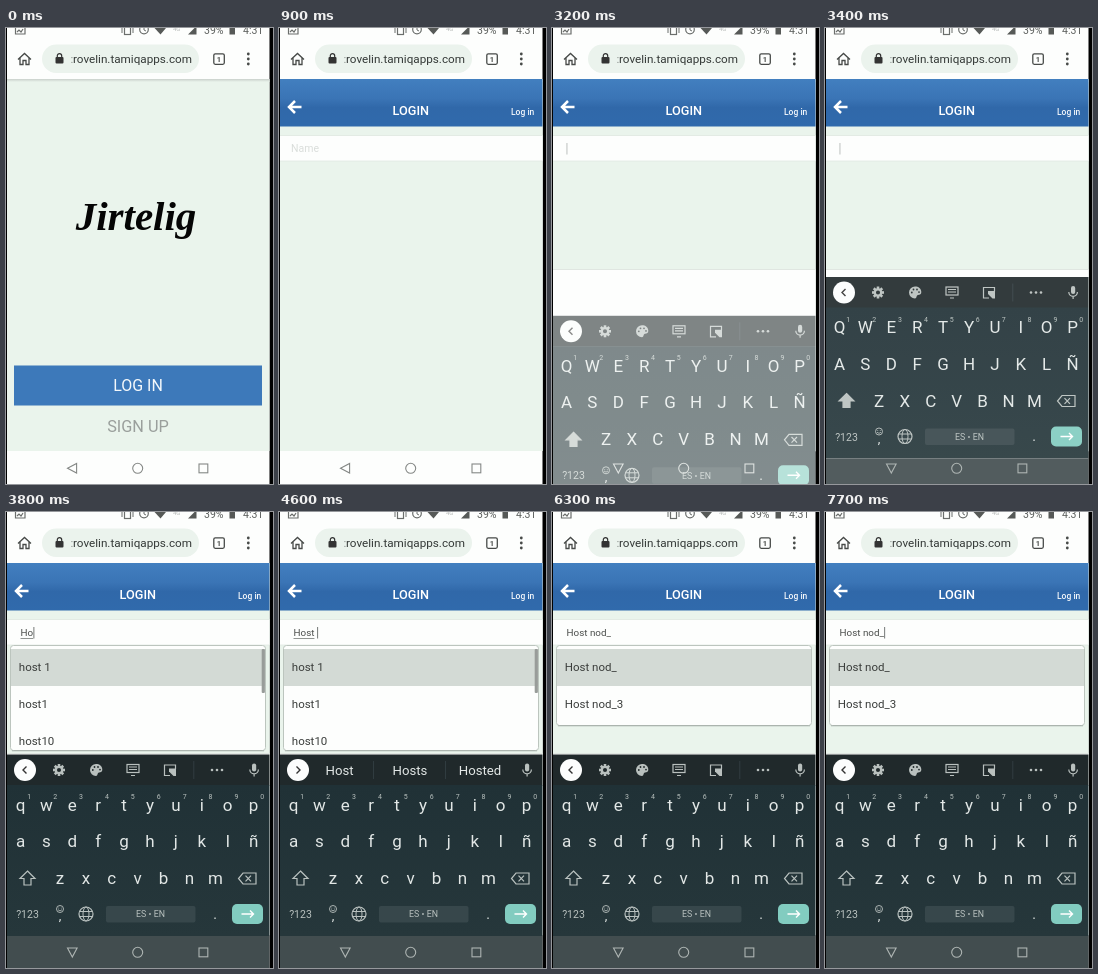
An HTML page for the animation above (8000 ms loop, 267 by 456 pixels).

```html
<!DOCTYPE html>
<html lang="en">
<head>
<meta charset="utf-8">
<title>Phone login</title>
<style>
html, body { margin: 0; width: 100%; height: 100%; overflow: hidden; background: #000; }
svg { display: block; width: 100vw; height: 100vh; font-family: Roboto, sans-serif; }
</style>
</head>
<body>
<svg id="stage" viewBox="0 0 267 456"></svg>
<script>
const LOOP = 8000, STEP = 100;
const stage = document.getElementById('stage');

function add(parent, tag, attrs = {}, text) {
  const el = document.createElementNS('http://www.w3.org/2000/svg', tag);
  for (const k in attrs) el.setAttribute(k, attrs[k]);
  if (text !== undefined) el.textContent = text;
  parent.appendChild(el);
  return el;
}
const group = (p, attrs) => add(p, 'g', attrs);
const rect = (p, x, y, width, height, fill, more) =>
  add(p, 'rect', { x, y, width, height, fill, ...more });
const circle = (p, cx, cy, r, fill, more) => add(p, 'circle', { cx, cy, r, fill, ...more });
const label = (p, x, y, size, fill, text, more) =>
  add(p, 'text', { x, y, 'font-size': size, fill, ...more }, text);
const line = (p, d, stroke, w = 1.2, more) =>
  add(p, 'path', { d, fill: 'none', stroke, 'stroke-width': w, ...more });
const shape = (p, d, fill) => add(p, 'path', { d, fill });
const MID = { 'text-anchor': 'middle' };
const ROUND = { 'stroke-linecap': 'round', 'stroke-linejoin': 'round' };
const show = (el, on) => el.setAttribute('display', on ? 'inline' : 'none');
const fade = (el, a) => el.setAttribute('opacity', a);
const clamp = v => Math.max(0, Math.min(1, v));

function gradient(defs, id, stops) {
  const g = add(defs, 'linearGradient', { id, x1: 0, y1: 0, x2: 0, y2: 1 });
  stops.forEach(([offset, color]) => add(g, 'stop', { offset, 'stop-color': color }));
}
const defs = add(stage, 'defs');
gradient(defs, 'bar', [[0, '#427fbf'], [0.42, '#3a74b5'], [0.6, '#3068a9'], [1, '#306aac']]);
gradient(defs, 'keys', [[0, '#203136'], [1, '#26373b']]);
gradient(defs, 'shade', [[0, '#c9d0cb'], [1, '#eaf4ec']]);
const clip = add(defs, 'clipPath', { id: 'screen' });
rect(clip, 1, 0, 262.5, 456, '#000');

rect(stage, 0, 0, 267, 456, '#000');
const screen = group(stage, { 'clip-path': 'url(#screen)' });
rect(screen, 0, 0, 264, 456, '#fdfefd');

// status bar
function drawStatus() {
  const g = group(screen), c = '#6b6e6c';
  line(g, 'M9.500 0V6H19V0M11 4L13 2L15 4L17 1', c, 1.2);
  rect(g, 118.5, -4, 6, 10.5, 'none', { stroke: c, 'stroke-width': 1.2 });
  line(g, 'M116 0V5M127 0V5', c, 1);
  circle(g, 138, 1.5, 4.3, 'none', { stroke: c, 'stroke-width': 1.2 });
  line(g, 'M138 -1V2L140 3', c, 1);
  shape(g, 'M148.500 0H160L154.500 6.500Z', '#565957');
  label(g, 167, 2.5, 6, '#b5b8b6', '4G');
  shape(g, 'M182 6.500L190.500 -2V6.500Z', '#565957');
  label(g, 198, 6, 10.5, '#5b5e5c', '39%');
  rect(g, 223.5, -4, 5.5, 10.5, '#565957');
  label(g, 237, 6, 10.5, '#5b5e5c', '4:31');
}

function drawBrowserBar() {
  const g = group(screen), c = '#474a48';
  line(g, 'M12 31.500L18.500 25.500L25 31.500M14 30V36.500H17V32.500H20V36.500H23V30', c, 1.3);
  rect(g, 36, 16.500, 157, 28.500, '#ebf3ed', { rx: 14.25 });
  rect(g, 49.5, 29, 8, 6.500, '#333', { rx: 1 });
  line(g, 'M51.300 30V27.800A2.200 2.200 0 0 1 55.700 27.800V30', '#333', 1.2);
  label(g, 64.5, 35, 11.7, '#8a908c', ':');
  label(g, 67, 35, 11.7, '#333836', 'rovelin.tamiqapps.com');
  rect(g, 207.8, 25.800, 10.5, 10.5, 'none', { rx: 1.5, stroke: c, 'stroke-width': 1.3 });
  label(g, 213, 33.800, 7.5, c, '1', { ...MID, 'font-weight': 700 });
  [26, 31, 36].forEach(y => circle(g, 242.3, y, 1.4, c));
}

function drawHome() {
  const g = group(screen);
  rect(g, 0, 51, 264, 372, '#eaf4ec');
  rect(g, 0, 51, 264, 3, 'url(#shade)');
  label(g, 130, 202, 41, '#050505', 'Jirtelig', {
    ...MID, 'font-family': '"Liberation Serif", serif', 'font-style': 'italic', 'font-weight': 700
  });
  const button = rect(g, 8, 337.5, 248, 40, '#3d79ba');
  label(g, 132, 363.3, 16, '#f4f8fb', 'LOG IN', MID);
  label(g, 132, 404, 16.3, '#9a9f9c', 'SIGN UP', MID);
  return { button };
}

function drawLogin() {
  const g = group(screen);
  rect(g, 0, 51, 264, 372, '#eaf4ec');
  rect(g, 0, 51, 264, 47.5, 'url(#bar)');
  line(g, 'M22.500 79H10.500M16 73L10 79L16 85', '#fff', 2.5);
  label(g, 131.8, 87, 12.7, '#fff', 'LOGIN', { ...MID, 'font-weight': 500 });
  label(g, 232, 87.3, 8.5, '#f3f7fb', 'Log in', { 'font-weight': 500 });
  rect(g, 0, 107.5, 264, 25.5, '#fdfefd', { stroke: '#dde5df', 'stroke-width': 0.7 });
  const hint = label(g, 12, 124, 10.5, '#dadedb', 'Name');
  const entry = label(g, 14.5, 124, 9.85, '#4a4d4b', '', { style: 'white-space:pre' });
  const under = rect(g, 14.5, 126, 0, 0.8, '#777b79');
  const caret = rect(g, 15, 115, 0.9, 11.5, '#777');
  const blank = group(g);
  rect(blank, 0, 241.5, 264, 182, '#fdfefd');
  rect(blank, 0, 241, 264, 0.7, '#d9dfda');
  return { g, hint, entry, under, caret, blank };
}

function drawList() {
  const g = group(screen);
  const box = rect(g, 4.5, 133.5, 255, 80, '#fdfefd', { rx: 3, stroke: '#bcc5be', 'stroke-width': 1 });
  const edge = line(g, '', '#9fa8a2', 0.8);
  rect(g, 5, 137, 254, 37, '#d3dad5');
  const cut = add(defs, 'clipPath', { id: 'list' });
  rect(cut, 4, 133, 256, 105, '#000');
  const inner = group(g, { 'clip-path': 'url(#list)' });
  const rows = [0, 1, 2].map(i => label(inner, 12.8, 159.3 + i * 36.8, 11.5, '#3a3d3b', ''));
  const thumb = rect(g, 255.7, 137, 3.2, 44, '#989c99', { rx: 1 });
  return { g, box, edge, rows, thumb };
}

function drawTools(p) {
  const g = group(p), c = '#b9c0be';
  const gear = group(g, { transform: 'translate(53 258)' });
  for (let a = 0; a < 360; a += 45) rect(gear, -1.3, -6, 2.6, 3, c, { transform: `rotate(${a})` });
  circle(gear, 0, 0, 3.2, 'none', { stroke: c, 'stroke-width': 2.3 });
  shape(g, 'M90 252A6 6 0 0 0 90 264C92 264 91 261 93 260.500C95 260 96.300 260 96.300 257.500C96.300 254 93.500 252 90 252Z', c);
  [[86.8, 258], [88.5, 255], [92, 255], [94, 257.6]].forEach(([x, y]) => circle(g, x, y, 0.9, '#20292b'));
  rect(g, 121, 252.5, 12, 8, 'none', { stroke: c, 'stroke-width': 1.2 });
  line(g, 'M123 255H131M123 257.500H131M125 263.500H129', c, 1.2);
  line(g, 'M169.500 257V253H158.500V263.500H164', c, 1.2);
  shape(g, 'M163 256.500H170V264H167.500L163 259.500Z', c);
  rect(g, 187.5, 249, 0.7, 18, '#38454a');
  [206, 211, 216].forEach(x => circle(g, x, 258, 1.3, c));
  return g;
}

function drawKeyboard() {
  const g = group(screen), c = '#e2e7e6', dim = '#b9c1bf';
  rect(g, 0, 242.5, 264, 31, '#20292b');
  rect(g, 0, 273, 264, 151, 'url(#keys)');
  rect(g, 0, 424, 264, 34, '#424d4f');
  const tools = drawTools(g);

  const words = group(g);
  const tips = [60.5, 131, 201].map(x => label(words, x, 262.5, 13.2, c, '', MID));
  [94, 166].forEach(x => rect(words, x, 249, 0.7, 18, '#38454a'));

  circle(g, 19, 258, 11, '#fcfdfd');
  const chevron = line(g, '', '#333', 1.4);
  rect(g, 246, 251.5, 4.2, 8, '#b9c0be', { rx: 2.1 });
  line(g, 'M243.800 257.500A4.300 4.300 0 0 0 252.400 257.500M248.100 262V264.500', '#b9c0be', 1.2);

  const letters = [];
  const row = (keys, x, y) => [...keys].forEach((k, i) => {
    const el = label(g, x + i * 25.9, y, 17, c, k, MID);
    letters.push({ el, k });
  });
  row('qwertyuiop', 14.5, 298.800);
  row('asdfghjklñ', 14.5, 335);
  row('zxcvbnm', 54, 372);
  [...'1234567890'].forEach((n, i) => label(g, 23.2 + i * 25.9, 287, 7, dim, n, MID));

  const shift = add(g, 'path', {
    d: 'M21.500 359L29 366.500H25V373H18V366.500H14Z', stroke: dim, 'stroke-width': 1.2
  });
  line(g, 'M237 361H250V372H237L232.500 366.500Z', dim, 1.2);
  line(g, 'M239.500 363.700L245 369.300M245 363.700L239.500 369.300', dim, 1.2);
  label(g, 21.5, 406, 10.5, dim, '?123', MID);
  circle(g, 54, 397, 3.5, 'none', { stroke: dim, 'stroke-width': 0.9 });
  line(g, 'M52 397.700Q54 400 56 397.700M52.700 395.700V396.500M55.300 395.700V396.500', dim, 0.8);
  label(g, 54, 408, 13, c, ',', MID);
  circle(g, 80, 402, 7, 'none', { stroke: dim, 'stroke-width': 1.2 });
  add(g, 'ellipse', { cx: 80, cy: 402, rx: 3, ry: 7, fill: 'none', stroke: dim, 'stroke-width': 1 });
  line(g, 'M73.700 399.500H86.300M73.700 404.500H86.300', dim, 1);
  rect(g, 100, 394, 89.5, 16.5, '#37474b', { rx: 2 });
  label(g, 144.5, 405.3, 8.8, dim, 'ES • EN', MID);
  label(g, 209, 406.5, 14, c, '.', MID);
  rect(g, 226, 392, 31, 20, '#82ccc0', { rx: 5 });
  line(g, 'M235.500 402H247.500M244 398.500L247.500 402L244 405.500', '#fff', 1.4);
  return { g, tools, words, tips, chevron, letters, shift };
}

drawStatus();
drawBrowserBar();
const home = drawHome();
const login = drawLogin();
const list = drawList();
const keyboard = drawKeyboard();
const nav = group(screen, { fill: 'none', 'stroke-width': 1.1 });
const back = add(nav, 'path', { d: 'M-4.800 0L4.300 -4.800V4.800Z' });
circle(nav, 131.7, 440.3, 5, 'none');
rect(nav, 193, 436, 8.8, 8.8, 'none');

// each entry holds from its time until the next one
const at = (track, t) => track.reduce((v, [start, value]) => t >= start ? value : v, null);
const TYPED = [
  [0, ''], [3700, 'H'], [3800, 'Ho'], [3900, 'Hos'], [4200, 'Host'], [4600, 'Host '],
  [5000, 'Host n'], [5200, 'Host no'], [5400, 'Host nod'], [5600, 'Host nod_']
];
const TIPS = [
  [0, null], [4000, ['Hos', 'Host', 'Hose']], [4200, ['Hos', 'Host', 'Hosts']],
  [4400, ['Host', 'Hosts', 'Hosted']], [5200, ['n', 'name', 'names']],
  [5500, ['nod', 'node', 'nods']], [5800, null]
];
const ROWS = [
  [0, null], [3800, ['host 1', 'host1', 'host10']],
  [4800, ['host 1', 'Host nod_', 'Host nod_3']], [5100, ['Host nod_', 'Host nod_3']]
];
const CARET = [[0, false], [2900, true], [6200, false], [6600, true], [7100, false], [7700, true]];

function updateEntry(t) {
  const text = at(TYPED, t), { entry, under, caret } = login;
  const width = s => {
    entry.textContent = s;
    return s ? entry.getComputedTextLength() : 0;
  };
  const head = t >= 5000 ? width('Host ') : 0;
  const word = width(text.trimEnd());
  const end = width(text);
  under.setAttribute('x', 14.5 + head);
  under.setAttribute('width', Math.max(0, word - head));
  show(under, text && t < 5800);
  caret.setAttribute('x', 14.5 + end + (text ? 0.3 : 0));
  caret.setAttribute('fill', text ? '#666a68' : '#b5bab7');
  show(caret, at(CARET, t));
  show(login.hint, t < 2900);
}

function updateList(t) {
  const rows = at(ROWS, t);
  show(list.g, rows);
  if (!rows) return;
  const full = rows.length > 2, bottom = full ? 238.5 : 213.5;
  list.box.setAttribute('height', bottom - 133.5);
  list.edge.setAttribute('d', `M6 ${bottom + 0.3}H258`);
  list.rows.forEach((r, i) => r.textContent = rows[i] || '');
  show(list.thumb, full);
  list.thumb.setAttribute('height', t < 4800 ? 44 : 96);
}

function updateKeyboard(t) {
  const left = 1 - clamp((t - 2900) / 700);
  const { g, tips, letters, shift, chevron } = keyboard;
  show(g, t >= 2900);
  g.setAttribute('transform', `translate(0 ${217 * left ** 2.8})`);
  fade(g, clamp((t - 2870) / 580));

  const upper = t < 3700;
  letters.forEach(({ el, k }) => el.textContent = upper ? k.toUpperCase() : k);
  shift.setAttribute('fill', upper ? '#b9c1bf' : 'none');

  const words = at(TIPS, t);
  show(keyboard.tools, !words);
  show(keyboard.words, words);
  if (words) tips.forEach((el, i) => el.textContent = words[i]);
  chevron.setAttribute('d', words ? 'M17.500 254.500L21 258L17.500 261.500' : 'M20.500 254.500L17 258L20.500 261.500');
}

function render(ms) {
  const t = Math.floor((ms % LOOP) / STEP) * STEP;
  home.button.setAttribute('fill', t === 500 ? '#3167a4' : '#3d79ba');
  fade(login.g, clamp((t - 700) / 200));
  show(login.blank, t >= 3100);
  updateEntry(t);
  updateList(t);
  updateKeyboard(t);
  back.setAttribute('transform', `translate(66.300 440.300) rotate(${t >= 3100 ? -90 : 0})`);
  nav.setAttribute('stroke', t < 3100 ? '#858886' : t < 3300 ? '#dfe3e1' : '#aeb5b3');
}

let start;
function tick(now) {
  if (start === undefined) start = now;
  render(now - start);
  requestAnimationFrame(tick);
}
render(0);
requestAnimationFrame(tick);
</script>
</body>
</html>
```
